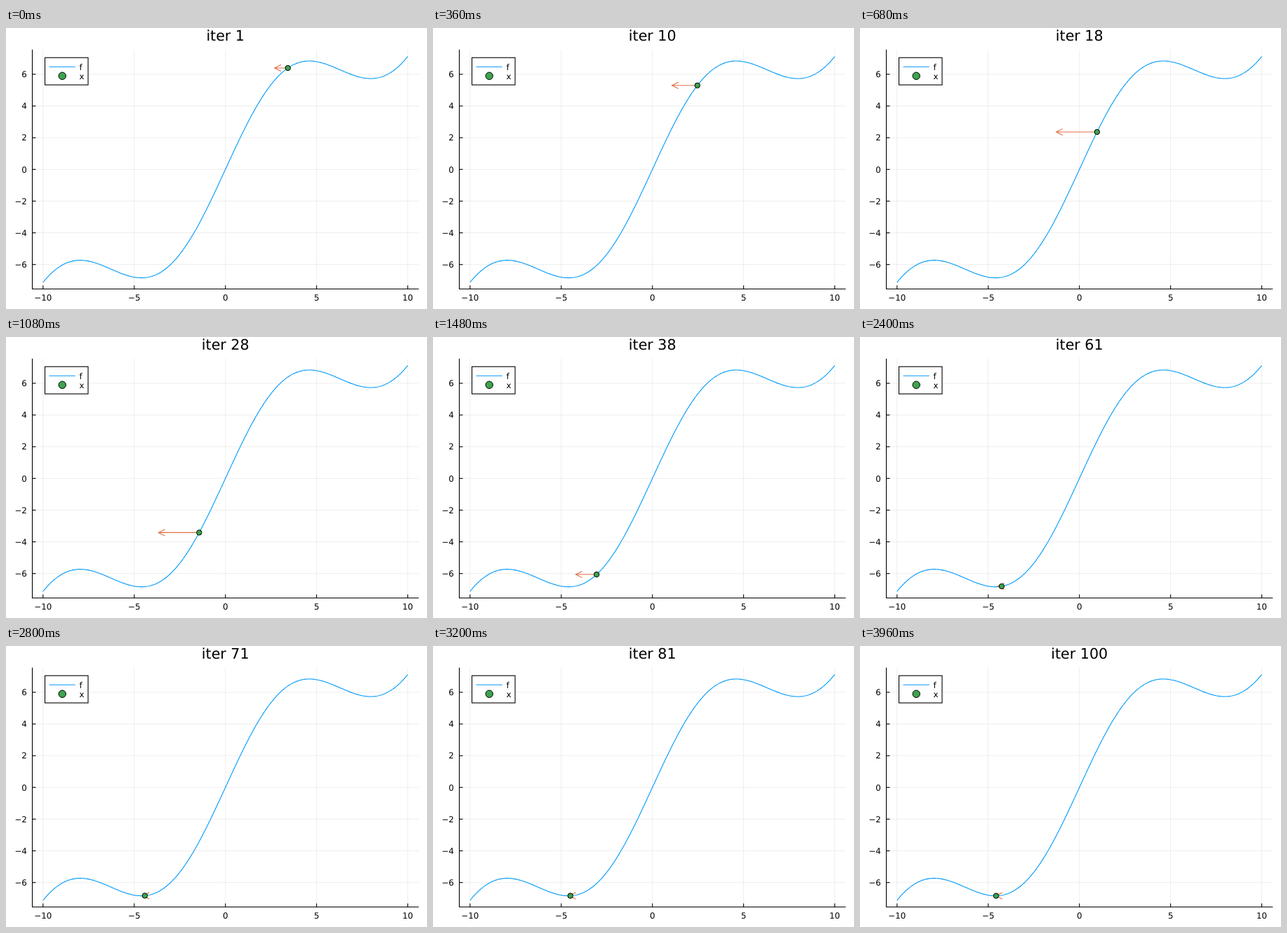
Write an HTML page that moves like this. It is 600 px wide and 400 px high and loops after 4 s.

```html
<!DOCTYPE html>
<html lang="en">
<head>
<meta charset="utf-8">
<title>Gradient descent</title>
<style>
  html, body { margin: 0; width: 100%; height: 100%; overflow: hidden; background: #fff; }
  svg { display: block; width: 600px; height: 400px; }
  text { font: 11.8px "DejaVu Sans", sans-serif; text-rendering: geometricPrecision; }
  #title { font-size: 20.6px; }
  .middle { text-anchor: middle; }
  .end { text-anchor: end; }
  .curve { fill: none; stroke: #009afa; stroke-width: 1.1; }
  .grid { stroke: #000; stroke-opacity: .07; }
  .axis { fill: none; stroke: #000; stroke-width: 1.1; }
  .dot { fill: #3da44d; stroke: #000; }
  #arrow { fill: none; stroke: #e26f46; stroke-width: 1.1; }
</style>
</head>
<body>
<svg id="plot" viewBox="0 0 600 400"></svg>
<script>
const STEP_MS = 40, STEPS = 100, RATE = 0.1, START = 3.5;
const LEFT = 37.5, RIGHT = 588.3, TOP = 30.7, BOTTOM = 371.5;

const f = x => x + 3 * Math.sin(x / 2);
const slope = x => 1 + 1.5 * Math.cos(x / 2);
const px = x => 312.7 + 25.99 * x;
const py = y => 201.3 - 22.57 * y;

const plot = document.getElementById("plot");
function add(tag, attributes, text = "") {
  const node = document.createElementNS("http://www.w3.org/2000/svg", tag);
  for (const [key, value] of Object.entries(attributes)) node.setAttribute(key, value);
  node.textContent = text;
  return plot.appendChild(node);
}
const path = (className, d) => add("path", { class: className, d });
const label = (className, x, y, text) => add("text", { class: className, x, y }, text);
const number = n => String(n).replace("-", "\u2212");

// Grid, ticks and tick labels
for (const x of [-10, -5, 0, 5, 10]) {
  path("grid", `M${px(x)} ${TOP}V${BOTTOM}`);
  path("axis", `M${px(x)} ${BOTTOM}v-5`);
  label("middle", px(x), 387.8, number(x));
}
for (const y of [-6, -4, -2, 0, 2, 4, 6]) {
  path("grid", `M${LEFT} ${py(y)}H${RIGHT}`);
  path("axis", `M${LEFT} ${py(y)}h5`);
  label("end", 29.8, py(y) + 4.3, number(y));
}
path("axis", `M${LEFT} ${TOP}V${BOTTOM}H${RIGHT}`);

const points = Array.from({ length: 401 }, (_, i) => i / 20 - 10);
path("curve", "M" + points.map(x => `${px(x).toFixed(2)} ${py(f(x)).toFixed(2)}`).join("L"));

const arrow = add("path", { id: "arrow" });
const dot = add("circle", { class: "dot", r: 3.7 });
const title = add("text", { id: "title", class: "middle", x: 312.7, y: 18 });

// Legend
add("rect", { x: 55.5, y: 42.2, width: 61.5, height: 38.8, fill: "#fff", stroke: "#000", "stroke-width": 1.1 });
path("curve", "M61.5 55.2H98.7");
add("circle", { class: "dot", cx: 80.2, cy: 68.2, r: 5.2 });
label("", 104.4, 59.5, "f");
label("", 104.4, 72.5, "x");

// Each state holds the new position and the slope that led to it
const states = [];
for (let x = START; states.length < STEPS;) {
  const gradient = slope(x);
  x -= RATE * gradient;
  states.push({ x, gradient });
}

function draw(time) {
  const step = Math.floor(time / STEP_MS) % STEPS;
  const { x, gradient } = states[step];
  const cx = px(x), cy = py(f(x)), tip = px(x - gradient);
  title.textContent = `iter ${step + 1}`;
  dot.setAttribute("cx", cx);
  dot.setAttribute("cy", cy);
  arrow.setAttribute("d", `M${cx} ${cy}H${tip}m9.3 -4.6L${tip} ${cy}l9.3 4.6`);
}

function tick(now) {
  draw(now);
  requestAnimationFrame(tick);
}
draw(0);
requestAnimationFrame(tick);
</script>
</body>
</html>
```
